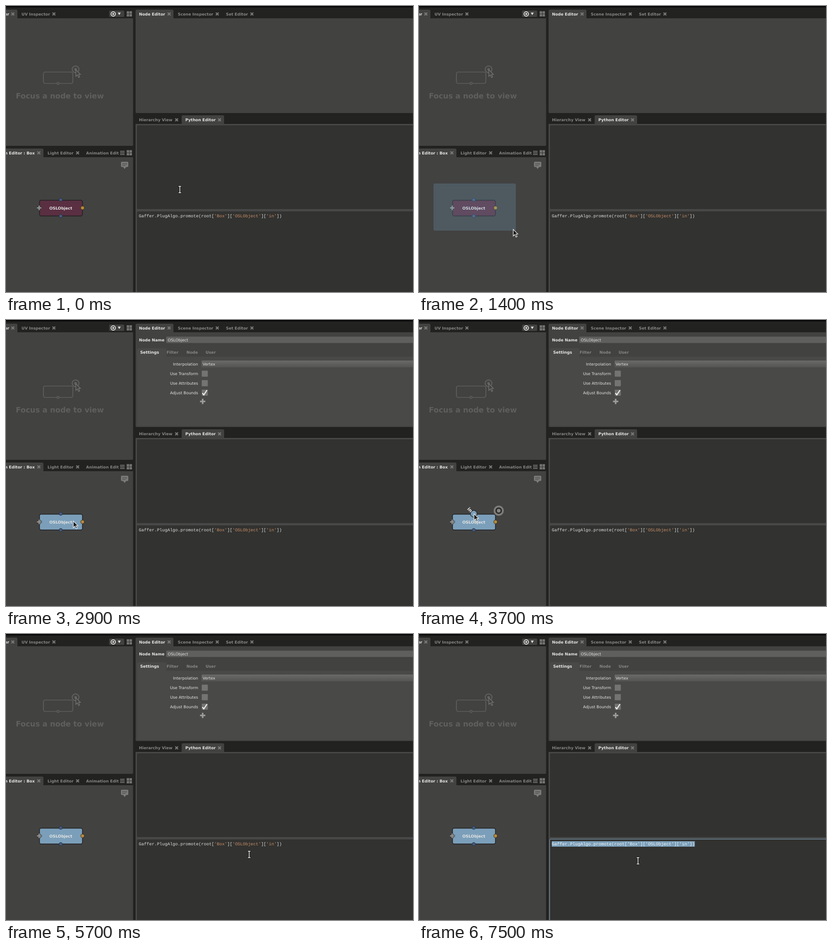
An HTML page with a canvas for the animation above (8 s loop, 892 by 628 pixels).

```html
<!DOCTYPE html>
<html lang="en">
<head>
<meta charset="utf-8">
<title>Node editor demo</title>
<style>
html, body { margin: 0; width: 100%; height: 100%; overflow: hidden; background: #222221; }
canvas { display: block; }
</style>
</head>
<body>
<canvas id="stage" width="892" height="628"></canvas>
<script>
const c = document.getElementById('stage').getContext('2d');
const LOOP = 8000, STEP = 100;
const PANEL = '#424241', STRIP = '#222221', BLUE = '#7b9fba', DIM = '#858584', LIGHT = '#e4e4e2';
const SANS = '"DejaVu Sans", sans-serif', MONO = '"Liberation Mono", monospace';
const CODE = "Gaffer.PlugAlgo.promote(root['Box']['OSLObject']['in'])";
const CODE_X = 291, CHAR = 5.7;

// Pointer keys: time, x, y
const path = [
  [0, 381, 403], [200, 350, 415], [300, 290, 432], [400, 220, 442], [500, 150, 430],
  [600, 90, 405], [700, 50, 392], [900, 32, 389], [1000, 80, 420], [1100, 157, 464],
  [1200, 190, 482], [1400, 206, 490], [1500, 206, 490], [1800, 150, 430], [2100, 46, 330],
  [2200, 41, 325], [2400, 20, 330], [2500, 50, 331], [2700, 39, 323], [2800, 39, 323],
  [2900, 147, 441], [3000, 147, 441], [3100, 129, 431], [3200, 129, 431], [3500, 120, 425],
  [3700, 120, 425], [4500, 138, 398], [4600, 93, 388], [4900, 93, 388], [5300, 150, 438],
  [5400, 150, 438], [5500, 250, 455], [5700, 533, 484], [5900, 612, 463], [6000, 612, 462],
  [6200, 480, 457], [6300, 480, 457], [6600, 262, 439], [6700, 262, 439], [7000, 480, 498]
];

function pointer(t) {
  // One sweep around the plug
  if (t > 3700 && t < 4500) {
    const a = 1.77 + (t - 3700) / 800 * 4.1;
    return [125 + 26 * Math.cos(a), 408 + 18 * Math.sin(a)];
  }
  const i = path.findIndex(k => k[0] > t);
  if (i < 0) return path[path.length - 1].slice(1);
  const [t0, x0, y0] = path[i - 1], [t1, x1, y1] = path[i];
  const u = (t - t0) / (t1 - t0);
  return [x0 + (x1 - x0) * u, y0 + (y1 - y0) * u];
}

function box(x, y, x2, y2, fill, r = 0, stroke, width = 1) {
  c.beginPath();
  c.roundRect(x, y, x2 - x, y2 - y, r);
  if (fill) { c.fillStyle = fill; c.fill(); }
  if (stroke) { c.strokeStyle = stroke; c.lineWidth = width; c.stroke(); }
}

function disc(x, y, r, fill, stroke, width = 1) {
  c.beginPath();
  c.arc(x, y, r, 0, 7);
  if (fill) { c.fillStyle = fill; c.fill(); }
  if (stroke) { c.strokeStyle = stroke; c.lineWidth = width; c.stroke(); }
}

function line(points, color, width) {
  c.beginPath();
  points.forEach(([x, y], i) => i ? c.lineTo(x, y) : c.moveTo(x, y));
  c.strokeStyle = color;
  c.lineWidth = width;
  c.stroke();
}

function text(s, x, y, color, { bold = true, size = 8.6, align = 'left', font = SANS } = {}) {
  c.font = `${bold ? 'bold ' : ''}${size}px ${font}`;
  c.textAlign = align;
  c.fillStyle = color;
  c.fillText(s, x, y);
}

function cross(x, y) {
  for (const d of [-3, 3]) line([[x - 3, y - d], [x + 3, y + d]], '#7b7b7a', 2.4);
}

function plus(x, y, r, color, width) {
  line([[x - r, y], [x + r, y]], color, width);
  line([[x, y - r], [x, y + r]], color, width);
}

function grid(x, y) {
  for (const dx of [0, 6.2]) for (const dy of [0, 6.2]) box(x + dx, y + dy, x + dx + 5.4, y + dy + 5.4, '#747473');
}

function tab(x, x2, y, y2) {
  box(x, y, x2, y2, PANEL, [3, 3, 0, 0]);
}

function arrow(x, y, fill, stroke, width = 1.2) {
  const shape = [[0, 0], [0, 14.5], [3.4, 11.3], [6, 17], [8.5, 15.9], [6, 10.4], [10.2, 10.2]];
  c.beginPath();
  for (const [dx, dy] of shape) c.lineTo(x + dx + .5, y + dy + .5);
  c.closePath();
  c.fillStyle = fill;
  c.fill();
  c.strokeStyle = stroke;
  c.lineWidth = width;
  c.stroke();
}

function beam(x, y) {
  for (const [color, w, e] of [['#181818', 3.4, 1], ['#f2f2f2', 1.5, 0]]) {
    line([[x, y - 7], [x, y + 7]], color, w);
    for (const d of [-7, 7]) line([[x - 3 - e, y + d], [x + 3 + e, y + d]], color, w);
  }
}

function frame() {
  box(0, 0, 892, 628, STRIP);
  box(0, 0, 892, 3, '#080808');
  box(0, 27, 278.5, 307, PANEL, [0, 0, 2, 0]);
  box(0, 332, 278.5, 628, PANEL);
  box(284, 27, 892, 235, PANEL, [0, 0, 0, 2]);
  box(284, 259, 892, 628, '#484847');
  box(287, 262, 892, 446, '#323230', [2, 0, 0, 2]);
  box(287, 451, 892, 628, '#323230', [2, 0, 0, 0]);

  tab(-9, 25, 8, 28);
  tab(284, 367, 8, 28);
  tab(-9, 82, 313, 333);
  tab(385, 478, 240, 260);

  text('Viewer', 7, 20.5, LIGHT, { align: 'right' });
  text('UV Inspector', 34, 20.5, DIM);
  text('Node Editor', 291.5, 20.5, LIGHT);
  text('Scene Inspector', 376.5, 20.5, DIM);
  text('Set Editor', 482, 20.5, DIM);
  text('Hierarchy View', 291.5, 253, DIM);
  text('Python Editor', 393, 253, LIGHT);
  text('Graph Editor : Box', 63, 325.5, LIGHT, { align: 'right' });
  text('Light Editor', 91, 325.5, DIM);
  text('Animation Edit', 175.5, 325.5, DIM);
  for (const [x, y] of [[15, 17.5], [105, 17.5], [357.5, 17.5], [463, 17.5], [539, 17.5],
    [374, 250], [468, 250], [72, 322.5], [157, 322.5]]) cross(x, y);

  box(226, 10, 259, 24, '#414140', 2);
  disc(235, 17.5, 4.8, null, '#eeeeec', 1.7);
  disc(235, 17.5, 2, '#eeeeec');
  c.beginPath();
  c.moveTo(245, 14.5); c.lineTo(251.5, 14.5); c.lineTo(248.2, 20);
  c.fillStyle = '#e0e0de';
  c.fill();
  grid(264.5, 11.5);
  grid(264.5, 316.5);
  for (const y of [319, 322.5, 326]) line([[250, y], [260, y]], '#8a8a89', 1.5);
}

function viewer() {
  const g = '#5f5f5e';
  box(82, 145, 146.5, 170, null, 4, g, 1.7);
  disc(114, 170, 2.4, PANEL, g, 1.5);
  disc(152.5, 139, 7.4, null, g, 2.3);
  disc(152.5, 139, 3, g);
  arrow(152.5, 139.5, PANEL, '#777776', 1.3);
  text('Focus a node to view', 21.5, 202.5, g, { size: 16.3 });

  box(252, 342, 268, 353.5, '#7c7c7b', 2);
  c.beginPath();
  c.moveTo(256.5, 353); c.lineTo(263.5, 353); c.lineTo(260, 358);
  c.fill();
  for (const [y, x] of [[345.5, 265.5], [348, 265.5], [350.5, 262]]) line([[254.5, y], [x, y]], '#4a4a49', 1);
}

function settings() {
  text('Node Name', 291.5, 46.5, LIGHT);
  box(351, 36.5, 892, 50.5, '#5f5f5e', [2, 0, 0, 2]);
  text('OSLObject', 354.5, 46.5, LIGHT, { bold: false });
  box(287, 80.5, 892, 233, '#494948');
  box(287, 62, 351.5, 81, '#494948', [3, 3, 0, 0]);
  text('Settings', 294, 73.5, LIGHT, { size: 8.8 });
  text('Filter', 352, 73.5, DIM);
  text('Node', 395.5, 73.5, DIM);
  text('User', 437.5, 73.5, DIM);

  const fade = c.createLinearGradient(0, 89, 0, 104);
  fade.addColorStop(0, '#6a6a69');
  fade.addColorStop(1, '#545453');
  box(428.5, 89, 892, 104, fade, [2, 0, 0, 2]);
  text('Vertex', 431, 99.7, LIGHT, { bold: false });
  ['Interpolation', 'Use Transform', 'Use Attributes', 'Adjust Bounds'].forEach((s, i) => {
    const y = i ? 100.3 + 20.9 * i : 99.7;
    text(s, 421, y, LIGHT, { bold: false, align: 'right' });
    if (i) box(429, y - 10, 442.3, y + 3.3, '#747473', 1);
  });
  line([[430.5, 160.5], [433.5, 164.5], [440.5, 154]], '#f4f4f2', 2.2);
  plus(431, 178.8, 5.8, '#9c9c9b', 3.4);
}

function node(t, selected) {
  const hover = t >= 3400 && t <= 3700;
  const plug = selected ? '#415d82' : '#455a84';
  box(73.5, 426.5, 167.5, 461, selected ? BLUE : '#5a2f42', 3.5, '#1f1f1f', 1.4);
  disc(120, 461.3, 3.6, plug, '#2a303a', 1);
  if (hover) disc(120, 425.5, 7.3, BLUE, '#222', 1.3);
  else disc(120, 425.5, 3.6, plug, '#2a303a', 1);
  disc(167.7, 443.3, 4, '#b78b3a', '#3a3020', 1);
  plus(72.7, 443.3, 5.8, '#30302f', 4.8);
  plus(72.7, 443.3, 5, '#929291', 3);
  text('OSLObject', 120, 446.7, LIGHT, { align: 'center' });

  if (t >= 3300 && t < 5100) {
    disc(174.7, 418.7, 11.4, '#7f7f7e', '#4b4b4a', .8);
    disc(174.7, 418.7, 7.3, '#2d2d2c');
    disc(174.7, 418.7, 4, '#858584');
  }
  const grow = Math.max(0, Math.min(1, (t - 3200) / 200, (5200 - t) / 375));
  if (grow) {
    c.save();
    c.translate(116, 422);
    c.rotate(Math.PI / 4);
    text('in', -1.5, 3, '#f0f0ee', { size: 10 * grow, align: 'right' });
    c.restore();
  }
}

function marquee(x, y) {
  box(32, 390, x + 6, y + 3, 'rgba(120,175,206,.22)', 3, 'rgba(120,175,206,.08)');
}

function code(t, x) {
  const active = t >= 6000;
  if (active) box(286.5, 450.5, 900, 640, null, 2, BLUE);
  const from = !active ? 55 : t >= 6600 ? 0 : Math.max(0, Math.min(55, Math.round((x - CODE_X) / CHAR)));
  if (from < 55) box(CODE_X + from * CHAR, 455, CODE_X + 55 * CHAR, 467, BLUE);
  let quoted = false;
  [...CODE].forEach((ch, i) => {
    const string = quoted || ch === "'";
    if (ch === "'") quoted = !quoted;
    text(ch, CODE_X + i * CHAR, 463.7, i >= from ? '#f6f6f4' : string ? '#c98f68' : '#dededc',
      { bold: false, size: 9.5, font: MONO });
  });
  if (active && t < 7500) {
    const cx = CODE_X + from * CHAR;
    line([[cx, 455], [cx, 467]], '#e8e8e6', 1);
  }
}

function draw(now) {
  const t = Math.floor(now % LOOP / STEP) * STEP;
  const [x, y] = pointer(t);
  const selected = t >= 1600;
  c.textRendering = 'geometricPrecision';
  frame();
  viewer();
  if (selected) settings();
  node(t, selected);
  if (t >= 1000 && t < 1600) marquee(x, y);
  code(t, x);
  if (x > 285 || t >= 6000) beam(x, y);
  else arrow(x, y, '#1c1c1c', '#f0f0f0');
  requestAnimationFrame(draw);
}
requestAnimationFrame(draw);
</script>
</body>
</html>
```
